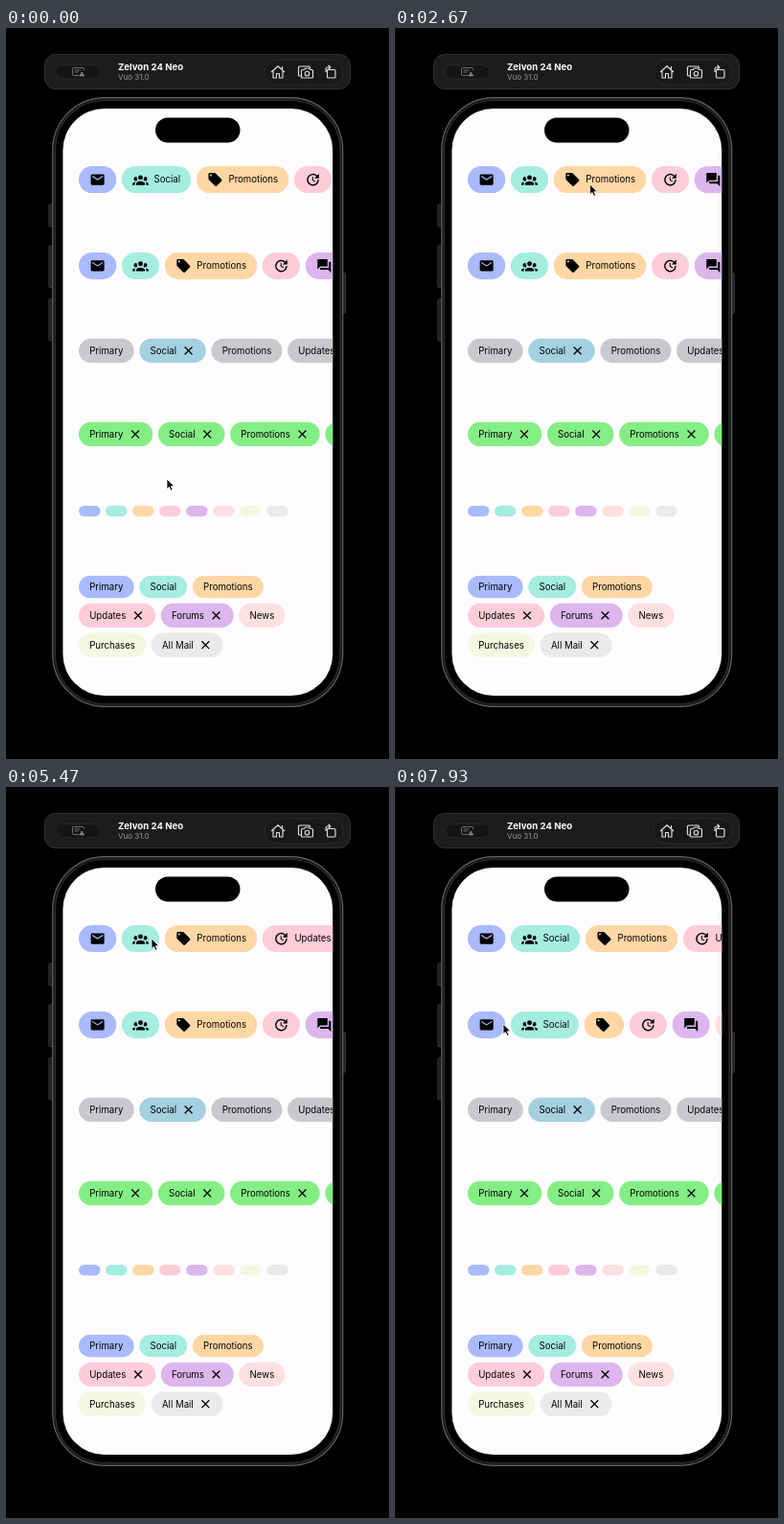
An HTML page for the animation above (8 s loop, 400x762 px).

```html
<!DOCTYPE html>
<html lang="en">
<head>
<meta charset="utf-8">
<title>Chip groups</title>
<style>
  html, body { margin: 0; width: 100%; height: 100%; overflow: hidden; background: #000; }
  body > svg { display: block; font: 9.65px Inter, Roboto, sans-serif; }
</style>
</head>
<body>
<svg width="400" height="762" viewBox="0 0 400 762">
  <defs>
    <clipPath id="screen"><rect x="59.4" y="84" width="281.8" height="612" rx="43.5"/></clipPath>
    <path id="mail" d="M20 4H4a2 2 0 0 0-2 2v12a2 2 0 0 0 2 2h16a2 2 0 0 0 2-2V6a2 2 0 0 0-2-2zm0 4l-8 5-8-5V6l8 5 8-5z"/>
    <g id="people">
      <circle cx="12" cy="9" r="3.5"/>
      <path d="M5.500 20v-1.750c0-5 13-5 13 0V20z"/>
      <g id="side">
        <path d="M6.530 8.420a3 3 0 1 0 1.130 3.960 6 6 0 0 1-1.130-3.960z"/>
        <path d="M0 20v-1.500c0-1.400 1.900-2.560 4.450-2.900a4 4 0 0 0-.95 2.650V20z"/>
      </g>
      <use href="#side" transform="matrix(-1 0 0 1 24 0)"/>
    </g>
    <path id="tag" d="M21.400 11.600l-9-9A2 2 0 0 0 11 2H4a2 2 0 0 0-2 2v7a2 2 0 0 0 .6 1.400l9 9a2 2 0 0 0 2.800 0l7-7a2 2 0 0 0 0-2.800zM5.500 7a1.500 1.500 0 1 1 0-3 1.500 1.500 0 0 1 0 3z"/>
    <path id="clock" d="M21 10.100h-6.800l2.750-2.800a7 7 0 1 0 2.050 4.800h2a9 9 0 1 1-2.700-6.300L21 3zM12.500 8v4.250l3.500 2.100-.7 1.200L11 13V8z"/>
    <path id="forum" d="M21 6h-2v9H6v2a1 1 0 0 0 1 1h11l4 4V7a1 1 0 0 0-1-1zm-4 6V3a1 1 0 0 0-1-1H3a1 1 0 0 0-1 1v14l4-4h10a1 1 0 0 0 1-1z"/>
    <path id="paper" fill-rule="evenodd" d="M2 4h20v15a2 2 0 0 1-2 2H4a2 2 0 0 1-2-2zM4 8v3h16V8zM4 13v6h7v-6zM13 13v2h7v-2zM13 17v2h7v-2z"/>
    <path id="cross" d="M-3.900-3.900L3.900 3.900M3.900-3.900L-3.900 3.900" stroke="#000" stroke-width="1.300"/>
  </defs>

  <rect width="400" height="762"/>

  <g fill="none" stroke="#dededf" stroke-width="1.150" stroke-linejoin="round">
    <rect x="40.500" y="27.500" width="319" height="36" rx="11" fill="#1c1b1d" stroke="#303032" stroke-width="1"/>
    <rect x="52" y="38.500" width="47" height="14.500" rx="7.250" fill="#151416" stroke="#2b2b2d" stroke-width=".8"/>
    <rect x="270" y="33" width="82" height="26" rx="13" fill="#18171a" stroke="#2e2e30" stroke-width=".8"/>
    <g stroke="#858587" stroke-width=".8">
      <path d="M76 49.500H70.500a1 1 0 0 1-1-1v-6a1 1 0 0 1 1-1h10a1 1 0 0 1 1 1V44M71.500 44h6M71.500 46h4"/>
      <path fill="#858587" d="M77 50v-1q2-1.500 4.500 0v1zM78.500 46.500h1.500v1.300h-1.500z"/>
    </g>
    <path d="M277 46l7-6.300 7 6.300M279 44.700V52h3.500v-4.500h3V52h3.500v-7.300M288.500 43v-3"/>
    <path d="M308 50h-1.500a1 1 0 0 1-1-1v-8a1 1 0 0 1 1-1h10a1 1 0 0 1 1 1v1"/>
    <path d="M309.500 43.500h2l1-1.500h4l1 1.500h2a1 1 0 0 1 1 1v6.500a1 1 0 0 1-1 1h-10a1 1 0 0 1-1-1v-6.500a1 1 0 0 1 1-1z"/>
    <circle cx="314.500" cy="47.500" r="2.300"/>
    <path d="M335.500 43.500h7.500a1 1 0 0 1 1 1v6.500a1 1 0 0 1-1 1h-6.500a1 1 0 0 1-1-1zM334 46v-3a2 2 0 0 1 2-2h2.500M336.500 38.700l2.300 2.300-2.300 2.300"/>
  </g>
  <text x="117" y="44.200" fill="#fff" font-size="9.600" font-weight="700">Zelvon 24 Neo</text>
  <text x="117" y="54" fill="#98989a" font-size="8">Vuo 31.0</text>

  <g fill="#1f1f21" stroke="#444446" stroke-width=".7">
    <rect x="44.800" y="184" width="6" height="23" rx="1"/>
    <rect x="44.800" y="227" width="6" height="43.500" rx="1"/>
    <rect x="44.800" y="282.500" width="6" height="43.500" rx="1"/>
    <rect x="348.500" y="255.500" width="6" height="42" rx="1"/>
  </g>
  <rect x="48.700" y="72.700" width="303" height="634.600" rx="54.500" fill="#19191b" stroke="#616163" stroke-width="1.200"/>
  <rect x="51.500" y="75.500" width="297.400" height="629" rx="51.500" stroke="#2c2c2e" stroke-width="1.200"/>
  <g clip-path="url(#screen)">
    <rect width="400" height="762" fill="#fefcff"/>
    <rect x="156" y="93.500" width="88.500" height="26" rx="13" fill="#000"/>
    <g id="content"></g>
  </g>
  <path id="cursor" d="M0 0V10.600L2.400 8.400L4.200 12.300L6 11.500L4.300 7.700H7.700Z" stroke="#fff" stroke-width=".8" stroke-linejoin="round"/>
</svg>
<script>
const LOOP = 8000, TRAVEL = 700, TAP_DELAY = 120, TOGGLE = 320;
// Layout on an 8-point grid; one point is UNIT pixels.
const UNIT = 0.701, GAP = 8 * UNIT, PAD = 16 * UNIT, ICON = 24 * UNIT, CLOSE = 20 * UNIT;
const LEFT = 76, RIGHT = 324, TOP = 144, SECTION_GAP = 61.85;
const ICON_ROW = 40 * UNIT, PLAIN_ROW = 33 * UNIT, CLOSE_ROW = 36 * UNIT, BAR = 16 * UNIT;

const content = document.getElementById('content');
const cursor = document.getElementById('cursor');

const items = [
  { label: 'Primary', color: '#a9bafd', icon: 'mail' },
  { label: 'Social', color: '#a5ede0', icon: 'people' },
  { label: 'Promotions', color: '#ffd7a4', icon: 'tag' },
  { label: 'Updates', color: '#ffccd9', icon: 'clock', closable: true },
  { label: 'Forums', color: '#dcb6ec', icon: 'forum', closable: true },
  { label: 'News', color: '#fde0e0', icon: 'paper' },
  { label: 'Purchases', color: '#f6f7e1' },
  { label: 'All Mail', color: '#ebe9ec', closable: true }
];

const multi = { open: ['Social', 'Promotions'] };
const single = { open: ['Promotions'], exclusive: true };

// Where the pointer arrives, when, and which chip it taps there.
const visits = [
  { at: 0, x: 168, y: 470 },
  { at: 2070, x: 161, y: 162, group: multi, tap: 'Social' },
  { at: 2700, x: 204, y: 163, group: multi, tap: 'Promotions' },
  { at: 3270, x: 233, y: 163, group: multi, tap: 'Updates' },
  { at: 4200, x: 237, y: 155 },
  { at: 4700, x: 196, y: 158, group: multi, tap: 'Promotions' },
  { at: 5470, x: 152, y: 158, group: multi, tap: 'Social' },
  { at: 6930, x: 199, y: 258 },
  { at: 7530, x: 150, y: 250, group: single, tap: 'Social' },
  { at: 7930, x: 113, y: 247 }
];

function smooth(v) {
  v = Math.min(1, Math.max(0, v));
  return v * v * (3 - 2 * v);
}

function add(parent, tag, attrs, text) {
  const node = document.createElementNS('http://www.w3.org/2000/svg', tag);
  for (const key in attrs) node.setAttribute(key, attrs[key]);
  if (text) node.textContent = text;
  parent.appendChild(node);
  return node;
}

function measure(label) {
  const probe = add(content, 'text', {}, label);
  const width = probe.getComputedTextLength();
  probe.remove();
  return width;
}

for (const item of items) item.textWidth = measure(item.label);

function iconRow(group, y) {
  group.chips = items.filter(item => item.icon).map(item => {
    const box = add(content, 'svg', { y, height: ICON_ROW });
    add(box, 'rect', { width: '100%', height: ICON_ROW, rx: ICON_ROW / 2, fill: item.color });
    add(box, 'use', {
      href: '#' + item.icon,
      transform: `translate(${PAD} ${(ICON_ROW - ICON) / 2}) scale(${UNIT})`
    });
    const text = add(box, 'text', { x: PAD + ICON + GAP, y: ICON_ROW / 2 + 3.4 }, item.label);
    return { item, box, text, open: group.open.includes(item.label), flips: [] };
  });
  return y + ICON_ROW;
}

const chipWidth = chip => 2 * PAD + chip.textWidth + (chip.closable ? GAP + CLOSE : 0);

function labelLine(chips, y) {
  const height = chips.some(chip => chip.closable) ? CLOSE_ROW : PLAIN_ROW;
  const middle = y + height / 2;
  let x = LEFT;
  for (const chip of chips) {
    const width = chipWidth(chip);
    add(content, 'rect', { x, y, width, height, rx: height / 2, fill: chip.color });
    add(content, 'text', { x: x + PAD, y: middle + 3.4 }, chip.label);
    if (chip.closable) add(content, 'use', { href: '#cross', x: x + width - PAD - CLOSE / 2, y: middle });
    x += width + GAP;
  }
  return y + height;
}

function wrappedLines(chips, y) {
  const lines = [[]];
  let x = LEFT;
  for (const chip of chips) {
    const width = chipWidth(chip);
    if (x + width > RIGHT) {
      lines.push([]);
      x = LEFT;
    }
    lines[lines.length - 1].push(chip);
    x += width + GAP;
  }
  for (const line of lines) y = labelLine(line, y) + GAP;
}

function bars(y) {
  items.forEach((item, i) => add(content, 'rect', {
    x: LEFT + i * (2 * BAR + GAP), y, width: 2 * BAR, height: BAR, rx: BAR / 2, fill: item.color
  }));
  return y + BAR;
}

const choices = items.map(item => {
  const picked = item.label === 'Social';
  return { ...item, color: picked ? '#a4d0e0' : '#cac8cc', closable: picked };
});
const removable = items.map(item => ({ ...item, color: '#84ee84', closable: true }));

let y = iconRow(multi, TOP) + SECTION_GAP;
y = iconRow(single, y) + SECTION_GAP;
y = labelLine(choices, y) + SECTION_GAP;
y = labelLine(removable, y) + SECTION_GAP;
y = bars(y) + SECTION_GAP;
wrappedLines(items, y);

// Replay the taps once to learn when each chip opens or closes.
for (const { at, group, tap } of visits.filter(visit => visit.tap)) {
  const state = group.chips.map(chip => chip.open !== chip.flips.length % 2 > 0);
  group.chips.forEach((chip, i) => {
    const hit = chip.item.label === tap;
    if (hit || (group.exclusive && state[i])) chip.flips.push(at + TAP_DELAY);
  });
}

function openness(chip, t) {
  let direction = chip.open ? -1 : 1, amount = +chip.open;
  for (const start of chip.flips) {
    amount += direction * smooth((t - start) / TOGGLE);
    direction = -direction;
  }
  return amount;
}

function pointerAt(t) {
  let { x, y } = visits[0];
  visits.slice(1).forEach((visit, i) => {
    const start = Math.max(visits[i].at + TAP_DELAY, visit.at - TRAVEL);
    const k = smooth((t - start) / (visit.at - start));
    x += (visit.x - x) * k;
    y += (visit.y - y) * k;
  });
  return [x, y];
}

function draw(t) {
  for (const group of [multi, single]) {
    let x = LEFT;
    for (const chip of group.chips) {
      const amount = openness(chip, t);
      const width = 2 * PAD + ICON + (GAP + chip.item.textWidth) * amount;
      chip.box.setAttribute('x', x);
      chip.box.setAttribute('width', width);
      chip.text.setAttribute('opacity', amount);
      x += width + GAP;
    }
  }
  cursor.setAttribute('transform', `translate(${pointerAt(t)})`);
}

function tick() {
  draw(performance.now() % LOOP);
  requestAnimationFrame(tick);
}
tick();
</script>
</body>
</html>
```
